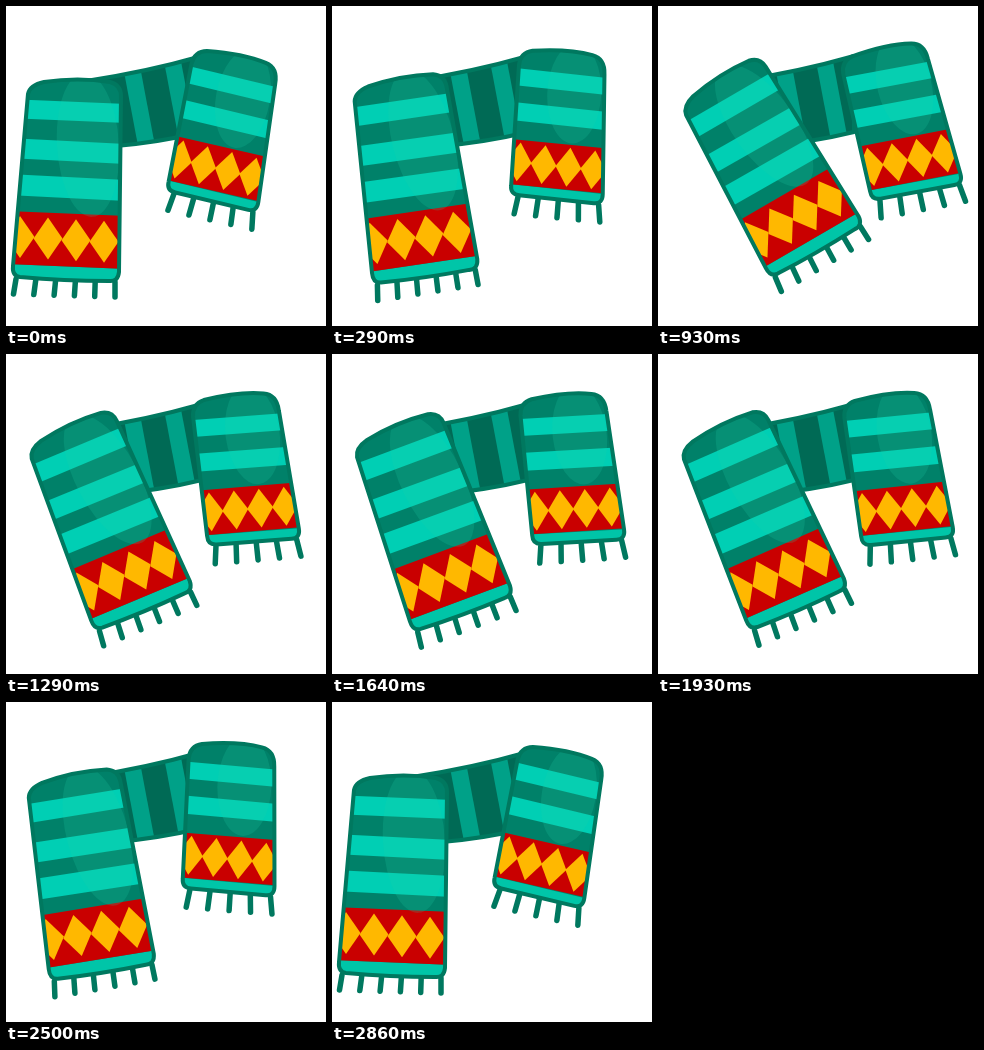
These frames come from a looping animation (320 px wide and 320 px high, 2.93 s). An HTML page with a canvas:

```html
<!DOCTYPE html>
<html lang="en">
<head>
<meta charset="utf-8">
<title>Swinging scarf</title>
<style>
  html, body { margin: 0; width: 100%; height: 100%; overflow: hidden; background: #fff; }
  canvas { display: block; }
</style>
</head>
<body>
<canvas id="stage" width="320" height="320"></canvas>
<script>
const ctx = document.getElementById('stage').getContext('2d');
const LOOP = 2930, STEPS = 41;
const EDGE = '#00785f', BASE = '#008169', LIGHT = '#00cfb4';
const RED = '#c90000', YELLOW = '#ffb800';

// [step, left swing in degrees]
const LEFT_KEYS = [[0, 0], [8, 21.5], [13, 32.5], [14, 32.5], [20, 21.5],
  [23, 23.5], [26, 27], [31, 22.5], [35, 8], [40, 0]];
// [step, right angle in degrees, pivot x, pivot y]
const RIGHT_KEYS = [[0, 13.4, 238, 62], [8, -1.2, 241, 52], [13, -10.5, 235, 51],
  [14, -11, 235, 51], [20, -1, 240, 51], [23, -4.3, 240, 51], [25.5, -8, 237, 51],
  [31, 0.6, 238.5, 50.5], [35, 6.7, 234, 54.5], [40, 13.4, 238, 62]];

function pose(keys, step) {
  let i = 1;
  while (i < keys.length - 1 && keys[i][0] < step) i++;
  const a = keys[i - 1], b = keys[i];
  const k = (step - a[0]) / (b[0] - a[0]);
  return a.slice(1).map((v, j) => v + (b[j + 1] - v) * k);
}

function poly(points, color) {
  ctx.beginPath();
  points.forEach(([x, y]) => ctx.lineTo(x, y));
  ctx.closePath();
  ctx.fillStyle = color;
  ctx.fill();
}

// A strip across the cloth; `tilt` is the drop from x0 to x1.
function strip(x0, x1, top, bottom, tilt, color) {
  poly([[x0, top], [x1, top + tilt], [x1, bottom + tilt], [x0, bottom]], color);
}

function diamond(x, y, w, h) {
  poly([[x - w, y], [x, y - h], [x + w, y], [x, y + h]], YELLOW);
}

function shine(x, y, rx, ry, angle) {
  ctx.beginPath();
  ctx.ellipse(x, y, rx, ry, angle, 0, 7);
  ctx.fillStyle = 'rgba(30,205,165,0.2)';
  ctx.fill();
}

function fringe(count, x0, x1, y0, y1, length, lean0, lean1) {
  ctx.lineWidth = 5.5;
  ctx.strokeStyle = EDGE;
  ctx.beginPath();
  for (let i = 0; i < count; i++) {
    const k = i / (count - 1);
    const x = x0 + (x1 - x0) * k, y = y0 + (y1 - y0) * k;
    ctx.moveTo(x, y);
    ctx.lineTo(x + lean0 + (lean1 - lean0) * k, y + length);
  }
  ctx.stroke();
}

function cloth(outline, paint) {
  ctx.save();
  ctx.clip(outline);
  ctx.fillStyle = BASE;
  ctx.fill(outline);
  paint();
  ctx.restore();
  ctx.lineWidth = 4;
  ctx.strokeStyle = EDGE;
  ctx.stroke(outline);
}

const neckShape = new Path2D('M80 75 Q140 66 196 50 L196 126 Q155 136 110 140 Z');
const leftShape = new Path2D('M22 88 Q24 79 38 76 Q72 71 104 76 Q115 79 115 90' +
  ' L113 266 Q112 276 103 275 Q58 275 14 271 Q6 270 7 260 Z');
const rightShape = new Path2D('M-52 8 Q-52 -5 -40 -8 Q-4 -14 20 -10 Q33 -8 34 8' +
  ' L45 127 Q46 137 37 137 L-38 137 Q-47 137 -47 128 Z');

function neck() {
  cloth(neckShape, () => {
    ctx.fillStyle = '#006a55';
    ctx.fillRect(70, 40, 130, 110);
    for (const x of [115, 157]) {
      poly([[x, 50], [x + 17, 50], [x + 35, 145], [x + 18, 145]], '#00a188');
    }
  });
}

function leftEnd(step) {
  const [swing] = pose(LEFT_KEYS, step);
  ctx.save();
  ctx.translate(61, 88);
  ctx.rotate(-swing * Math.PI / 180);
  ctx.translate(-61, -88);
  fringe(6, 10, 109, 273, 276, 15, -2.5, 0);
  cloth(leftShape, () => {
    strip(0, 120, 93, 112, 5, LIGHT);
    strip(0, 120, 132, 152, 6, LIGHT);
    strip(0, 120, 168, 189, 6, LIGHT);
    strip(0, 120, 258, 280, 5, '#00c5a8');
    strip(0, 120, 205, 258, 5, RED);
    for (let i = 0; i < 4; i++) diamond(14 + 28 * i, 231 + 1.6 * i, 14.5, 21);
    shine(82, 139, 31, 72, -0.06);
  });
  ctx.restore();
}

function rightEnd(step) {
  const [angle, x, y] = pose(RIGHT_KEYS, step);
  ctx.save();
  ctx.translate(x, y);
  ctx.rotate(angle * Math.PI / 180);
  fringe(5, -39, 42, 139, 138, 17, -2, 3);
  cloth(rightShape, () => {
    strip(-60, 60, 11, 28, 0, LIGHT);
    strip(-60, 60, 45, 63, 0, LIGHT);
    strip(-60, 60, 127, 140, 0, '#00c5a8');
    strip(-60, 60, 82, 127, -1, RED);
    for (let i = 0; i < 4; i++) diamond(-42 + 25 * i, 104, 13, 19.5);
    shine(6, 30, 27, 50, -0.06);
  });
  ctx.restore();
}

function draw() {
  const step = Math.floor(performance.now() % LOOP / LOOP * STEPS);
  ctx.fillStyle = '#fff';
  ctx.fillRect(0, 0, 320, 320);
  ctx.lineCap = ctx.lineJoin = 'round';
  neck();
  rightEnd(step);
  leftEnd(step);
  requestAnimationFrame(draw);
}
draw();
</script>
</body>
</html>
```
